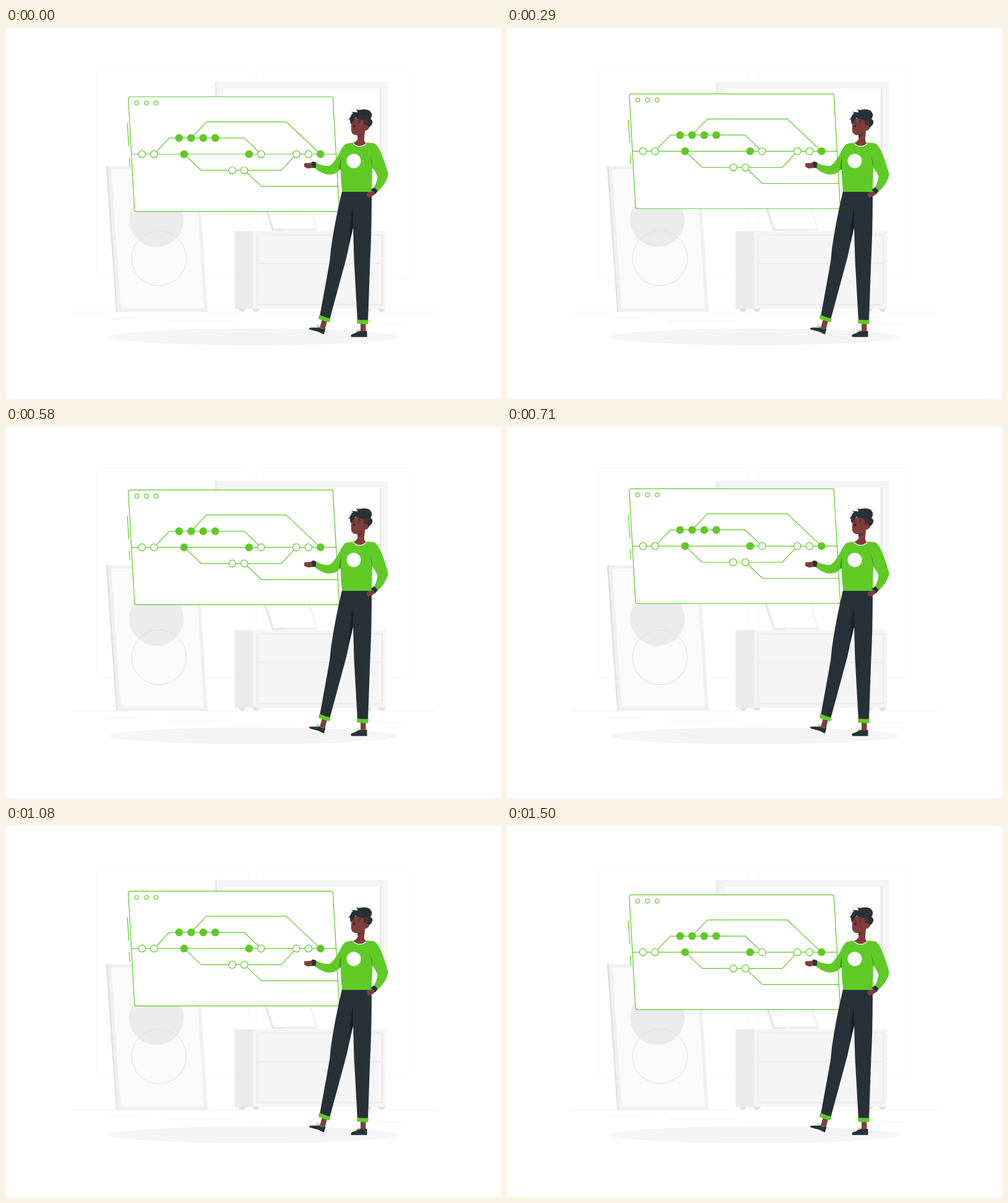
Recreate the animation shown at these times as an HTML page. Size 800x600 px, loop 1540 ms.

```html
<!DOCTYPE html>
<html lang="en">
<head>
<meta charset="utf-8">
<title>Branch board</title>
<style>
html, body { margin: 0; width: 100%; height: 100%; overflow: hidden; background: #fff; }
svg { display: block; width: 100vw; height: 100vh; }
.line { fill: none; stroke: #5fca26; stroke-width: 1.2; stroke-linecap: round; stroke-linejoin: round; }
.green { fill: #5fca26; }
.dark { fill: #263238; }
.skin { fill: #7f3e3b; }
</style>
</head>
<body>
<svg viewBox="0 0 800 600">
  <!-- room -->
  <g fill="none" stroke="#f8f8f8" stroke-width="1">
    <rect x="146.5" y="66.5" width="245" height="339" rx="5"/>
    <rect x="405.5" y="66.5" width="245" height="339" rx="5"/>
  </g>
  <path d="M105 459.3H697M162 469.5H218M224 469.5H231M258 474H369M588 467.5H600M601 478.5H641" stroke="#f3f3f3"/>
  <ellipse cx="400" cy="499.5" rx="233" ry="13.5" fill="#f5f5f5"/>

  <!-- wall frame -->
  <path d="M338 87H617V242H338z" fill="#f5f5f5"/>
  <path d="M338 87H340.500V242H338zM604 98H606.200V236H604z" fill="#e6e6e6"/>
  <path d="M352 98H604V236H352z" fill="#fff"/>

  <!-- poster -->
  <path d="M161.500 223.500H166L182 459H178z" fill="#e0e0e0"/>
  <path d="M164.500 223.500H311L326 459H180z" fill="#f0f0f0"/>
  <path d="M170 229H306L320 453.500H185.500z" fill="#fafafa"/>
  <circle cx="243" cy="310" r="44" fill="#ebebeb"/>
  <circle cx="247.300" cy="372.500" r="44.300" fill="none" stroke="#e0e0e0"/>

  <!-- cabinet -->
  <g fill="#e0e0e0">
    <circle cx="381.500" cy="453" r="6"/><circle cx="404" cy="453" r="6"/>
    <circle cx="585" cy="453" r="6"/><circle cx="607" cy="453" r="6"/>
  </g>
  <path d="M399 328.500H614V454H399z" fill="#f5f5f5"/>
  <path d="M369.500 328.500H399.500V454H369.500z" fill="#ebebeb"/>
  <path d="M406 334.700H608V447.500H406zM406 381H608" fill="none" stroke="#ebebeb" stroke-width="2.200"/>
  <path d="M406 334.700H432" stroke="#f2f2f2" stroke-width="2.200"/>
  <path d="M412 270L430.500 328H504L486 270z" fill="#f0f0f0"/>
  <path d="M411 270L430 328H450V326H432L415 270z" fill="#e6e6e6"/>
  <path d="M415 270L433 324.500H501L484 270z" fill="#fff"/>

  <!-- floating board -->
  <g id="board">
    <path class="line" style="fill:#fff" d="M201 111.250H525.500Q528.200 111.250 528.400 114L538.500 293.500Q538.600 296.700 535.500 296.700H211Q208 296.700 207.700 293.700L197.700 114.500Q197.700 111.250 201 111.250z"/>
    <path class="line" d="M196.300 154L198.300 190.500M199.300 210L200.200 224.500"/>
    <path class="line" d="M203 204H534M239.300 204L264 177.900H385L412.300 204M299.200 177.900L324 151.800H453L508.300 204M288 204L315.500 230.200H445L469.300 204M385.200 230.200L413 256.200H537"/>
    <g id="nodes"></g>
  </g>

  <!-- shoes and ankles -->
  <path class="skin" d="M511 471L519 474L515.500 487L507 485zM573 477H581.500V492H573z"/>
  <path class="dark" d="M490 485.500Q491 484 498 484.500L507 484.500Q511 487.500 516.500 486L514 495.500Q508 493 504 491Q495 489 490 487z"/>
  <path class="dark" d="M557.500 497.500Q557 495.500 563 494L572 489.500Q577 492 583.500 489.500V499.700H558.500Q557 499.500 557.500 497.500z"/>
  <path class="line" style="stroke-width:.9" d="M501.500 482L506 484M503 480.500L507 484M567.500 488L572 490.500M566 491L571 490"/>

  <!-- trousers -->
  <path class="dark" d="M543 264H591Q591 330 588.500 375L585 474H568L562.500 375L561 322L550 372L523 472L507 466.500L520 395Q524 376 525 358Q531 315 543 264z"/>
  <path d="M561 291L561 323L554.500 349Q555 312 561 291z" fill="#182025"/>
  <path class="green" d="M506.300 463.800Q515 468 524.500 470L523 476Q513 474 505 470.200zM567 471.600Q577 473 586 471.800L585.200 479Q576 479 567.500 478z"/>

  <!-- hands -->
  <path class="skin" d="M482 218.800L491 218.300L497 216.500V226L488 227.200L482 224.500zM583 267.500L591 260L598 267.500L592 272L586 274.500Q582 272 583 267.500z"/>

  <!-- sweater -->
  <path class="green" d="M548 188Q553 185.500 562 185.500Q571 197 582 185.500Q592 185 596 187Q604 192 613 221L617.700 236Q617 243 611 253Q606 260 600 265L593.500 259.500Q599 252 600.500 240Q598 233 592 226L591 265H543.500Q541 250 541 227Q535 237 521 237Q510 236 499 226.500L500.500 217.500Q512 224 522 223Q528 221 538 204Q543 193 548 188z"/>
  <path d="M541.500 210L541 230L538.500 228Q538 219 541.500 210zM587 203L592 217V226Q590 212 587 203z" fill="#43911b"/>
  <circle cx="562" cy="215" r="11.500" fill="#fff"/>
  <path class="dark" d="M494 216.500Q498 215 501.500 218L500.500 226L496 226.500Q494 222 494 216.500zM589.500 262L594.500 257.800Q599 260 600.500 264L597 268.500Q594 264 589.500 262z"/>

  <!-- head -->
  <path class="skin" d="M568 170L568.300 180Q566 184 561 186Q571 197 582 187Q578.500 184 579 178L581 160z"/>
  <path d="M561 186.500Q571 196 582 187" fill="none" stroke="#fff" stroke-width="1.300"/>
  <path d="M568 173Q574 172 577 167Q576 175 568.200 177z" fill="#632e2c"/>
  <path class="skin" d="M560 147Q557 158 558 167Q560 174 568 173.300Q576 172 579 166Q585 167 588 159Q590 152 584 149L578 144z"/>
  <path class="dark" d="M553 148Q556 146 557.500 142Q558 139 561 137.500L557.500 135.500L568 136.500Q568 133.500 565.500 131.500Q570 133 574 132Q588 130 591 138.500Q592 143 589 147Q594 150 591.500 155Q590 160 585 160V149Q572 150 565 145Q561 149 558.500 156Q555.500 154 556 148z"/>
  <path d="M577.500 148.500L585 148V158.500Q581 156 578.500 157z" fill="#4c302f"/>
  <circle class="dark" cx="562.300" cy="152.800" r="1"/>
  <circle class="dark" cx="570.500" cy="153.800" r="1"/>
  <path d="M560 149.500L563 148.800M569 149.700L573 151M563.500 154.500L561.500 158.500L564 159.500" fill="none" stroke="#3b1d1c"/>
  <path d="M561 158Q563.500 159 565 156Q565 160 562 160.500z" fill="#30191a"/>
</svg>
<script>
const board = document.getElementById("board");
const nodes = document.getElementById("nodes");

function addNodes(y, r, xs, filled) {
  for (const x of xs) {
    const c = document.createElementNS("http://www.w3.org/2000/svg", "circle");
    Object.entries({ cx: x, cy: y, r, class: "line" }).forEach(([k, v]) => c.setAttribute(k, v));
    c.style.fill = filled ? "#5fca26" : "#fff";
    nodes.append(c);
  }
}
addNodes(121.3, 3.2, [211.3, 227, 242.6], false);
addNodes(177.9, 5.7, [279.7, 299.2, 318.8, 338.2], true);
addNodes(204, 5.7, [219.8, 239.3, 412.3, 469.3, 488.8], false);
addNodes(204, 5.7, [287.8, 392.8, 508.3], true);
addNodes(230.2, 5.7, [365.7, 385.2], false);

// Linear rise and fall, stepped at 24 pictures a second.
const LOOP = 1540, STEP = 1000 / 24;
const stops = [[0, 0], [722, -11.65], [1472, 0.35], [1500, 0.15], [LOOP, 0.1]];

function lift(t) {
  const i = stops.findIndex(s => s[0] > t);
  const [t0, y0] = stops[i - 1], [t1, y1] = stops[i];
  return y0 + (y1 - y0) * (t - t0) / (t1 - t0);
}

const start = performance.now();
function draw(now) {
  const t = Math.max(0, now - start) % LOOP;
  const step = Math.floor((Math.floor(t / 10) * 10 + 5) / STEP);
  board.setAttribute("transform", `translate(0 ${lift(step * STEP).toFixed(2)})`);
  requestAnimationFrame(draw);
}
draw(start);
</script>
</body>
</html>
```
